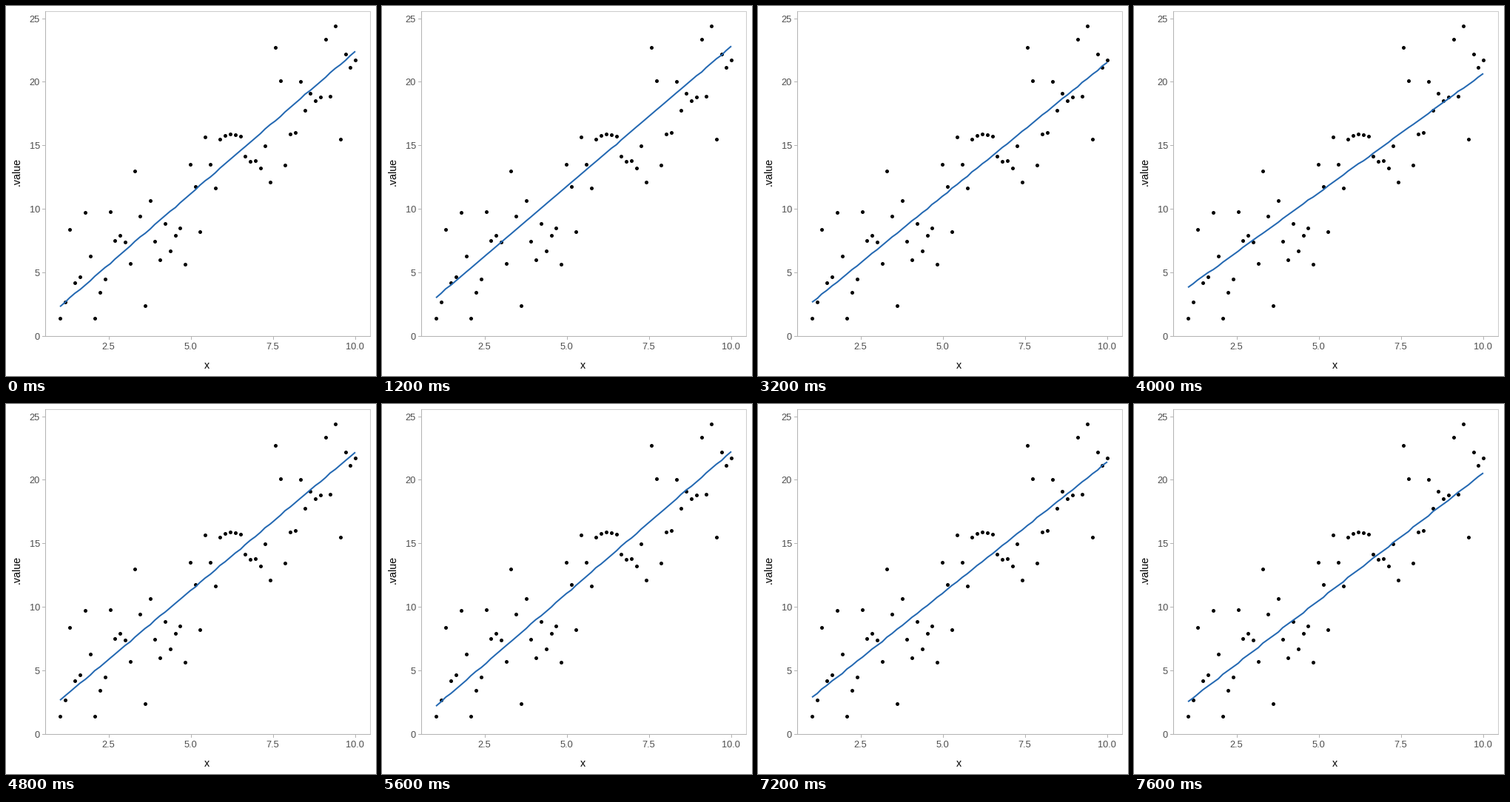
These frames come from a looping animation (500 by 500 pixels, 8000 ms). A matplotlib script:

```python
import math

import matplotlib.pyplot as plt
import numpy as np
from matplotlib.animation import FuncAnimation

PX = 0.72  # points per pixel at 100 dpi
FRAME_MS = 400
AXIS_GREY = "#B3B3B3"
BORDER_GREY = "#CCCCCC"
LINE_BLUE = "#2368B2"
LEFT, TOP, RIGHT, BOTTOM = 53, 7, 492, 446

plt.rcParams["font.family"] = "Liberation Sans"

# Each held fit: pixel heights of the line at x = 1 and x = 10
FITS = [
    (407, 62), (399, 54), (390, 68), (395, 55), (420, 76),
    (392, 79), (413, 53), (391, 80), (401, 77), (379, 77),
    (381, 92), (402, 93), (401, 66), (395, 74), (409, 65),
    (393, 83), (378, 82), (380, 86), (397, 79), (403, 94),
]


def to_px_x(x):
    return 72.9 + 44.36 * (x - 1)


def to_px_y(value):
    return 445.6 - 17.16 * value


def normal_quantile(p):
    low, high = -8.0, 8.0
    for _ in range(50):
        mid = (low + high) / 2
        if 0.5 * (1 + math.erf(mid / math.sqrt(2))) < p:
            low = mid
        else:
            high = mid
    return mid


def r_normals(count, seed):
    """Normal draws as R gives them: set.seed(seed); rnorm(count)."""
    keys = []
    for step in range(675):
        seed = (69069 * seed + 1) % 2**32
        if step > 50:
            keys.append(seed)
    rng = np.random.RandomState()
    rng.set_state(("MT19937", np.array(keys, dtype=np.uint32), 624))
    words = rng.randint(0, 2**32, size=2 * count, dtype=np.uint32)
    uniforms = words / 2**32
    big = 2**27
    return np.array([
        normal_quantile((math.floor(big * coarse) + fine) / big)
        for coarse, fine in zip(uniforms[::2], uniforms[1::2])
    ])


x_data = np.linspace(1, 10, 60)
y_data = 1 + 2 * x_data + 3 * r_normals(60, seed=123)

fig = plt.figure(figsize=(5, 5), dpi=100, facecolor="white")
ax = fig.add_axes([0, 0, 1, 1])
ax.set_xlim(0, 500)
ax.set_ylim(500, 0)
ax.axis("off")


def rule(xs, ys, color):
    ax.plot(xs, ys, color=color, lw=PX, antialiased=False,
            solid_capstyle="butt", zorder=1)


def label(x, y, text, size, color, **kwargs):
    ax.text(x, y, text, fontsize=size * PX, color=color, **kwargs)


def draw_panel():
    rule([LEFT, RIGHT], [TOP, TOP], BORDER_GREY)
    rule([RIGHT, RIGHT], [TOP, BOTTOM], BORDER_GREY)
    rule([LEFT, LEFT], [TOP, BOTTOM], AXIS_GREY)
    rule([LEFT, RIGHT], [BOTTOM, BOTTOM], AXIS_GREY)
    for value in (2.5, 5.0, 7.5, 10.0):
        x = round(to_px_x(value))
        rule([x, x], [BOTTOM, BOTTOM + 4], AXIS_GREY)
        label(x - 0.5, 464, f"{value:.1f}", 12.7, "#4D4D4D", ha="center")
    for value in range(0, 26, 5):
        y = round(to_px_y(value))
        rule([LEFT - 4, LEFT], [y, y], AXIS_GREY)
        label(46, y + 5, str(value), 12.7, "#4D4D4D", ha="right")
    label(271, 490, "x", 14.3, "black", ha="center")
    label(15, 224, ".value", 14.3, "black", ha="center", va="center",
          rotation=90)


draw_panel()
ax.plot(to_px_x(x_data), to_px_y(y_data) - 1, "o", color="black",
        ms=5 * PX, mew=0, zorder=2)
fit_line, = ax.plot([], [], color=LINE_BLUE, lw=2 * PX,
                    solid_capstyle="butt", zorder=3)


def update(frame):
    start, end = FITS[frame]
    # Whole-pixel vertices give the line its slight steps
    heights = np.round(np.linspace(start, end, len(x_data)))
    fit_line.set_data(np.round(to_px_x(x_data)), heights - 0.75)
    return fit_line,


anim = FuncAnimation(fig, update, frames=len(FITS), interval=FRAME_MS,
                     repeat=True, repeat_delay=0)
plt.show()
```
